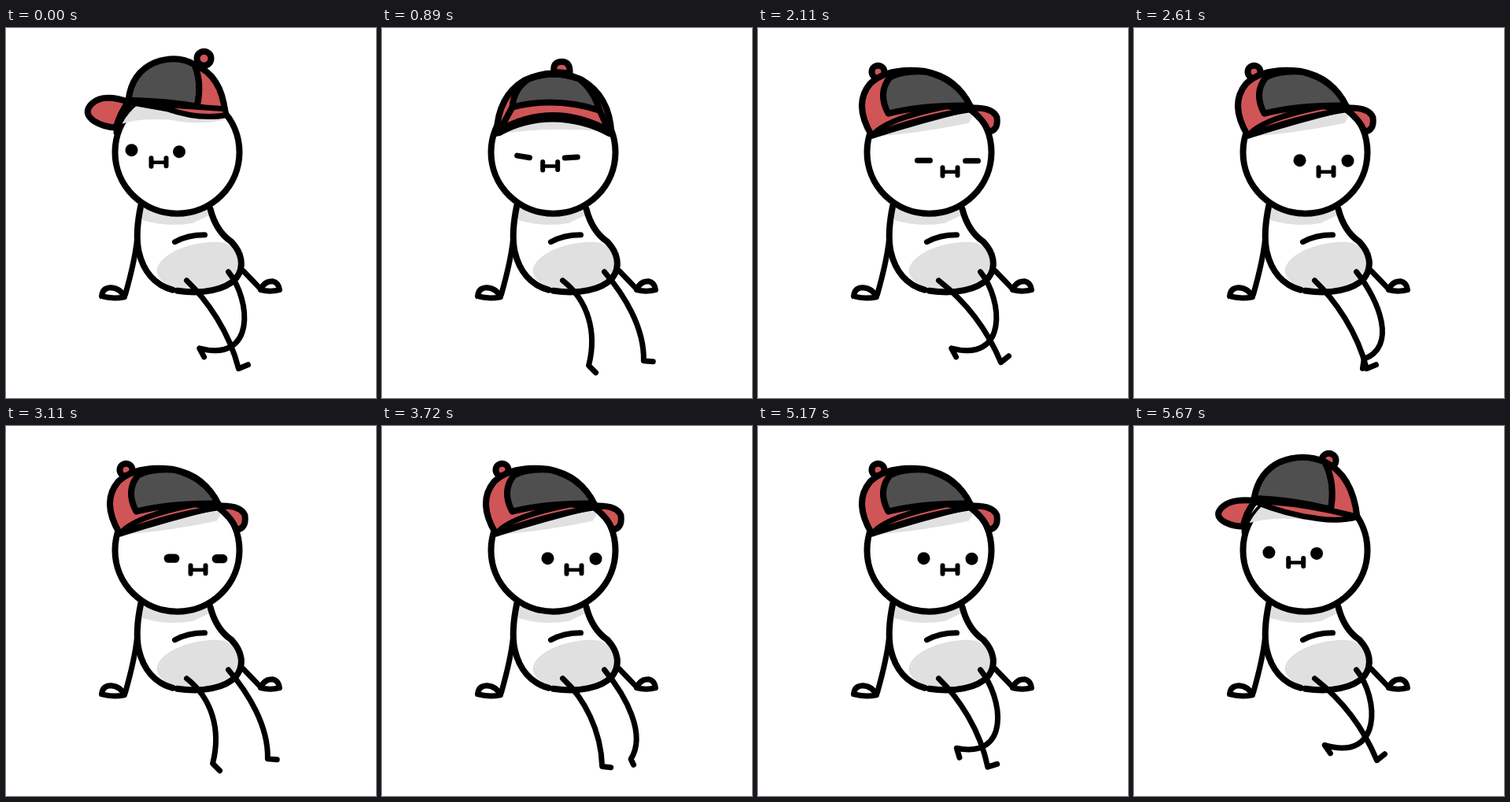
An HTML page that plays this animation: 470 by 470 pixels, repeating every 5.73 s.

```html
<!DOCTYPE html>
<html lang="en">
<head>
<meta charset="utf-8">
<title>Sitting figure</title>
<style>
  html, body { margin: 0; width: 100%; height: 100%; overflow: hidden; background: #fff; }
  svg { display: block; width: 100vw; height: 100vh; }
  .ink { fill: none; stroke: #000; stroke-width: 8; stroke-linecap: round; stroke-linejoin: round; }
  .thin { stroke-width: 7; }
  .white { fill: #fff; }
  .red { fill: #d05557; }
  .grey { fill: #4f4f4f; }
  .shade { fill: #e0e0e0; }
</style>
</head>
<body>
<svg viewBox=".5 -.7 470 470">
  <clipPath id="inHead"><ellipse cx="218" cy="157" rx="79" ry="78"/></clipPath>

  <g id="arms" class="ink thin">
    <path d="M167 268Q164 296 152 338"/>
    <path class="white" d="M122 340Q123 329 134 329Q146 330 151 341Q136 344 122 340Z"/>
    <path d="M302 308L324 331"/>
    <path class="white" d="M324 332Q328 321 339 321Q347 323 348 332Q336 335 324 332Z"/>
  </g>

  <g id="body">
    <path class="white" d="M172 222C164 268 166 322 214 332C258 342 300 326 300 302C300 265 270 278 260 226Z"/>
    <path class="shade" d="M174 226L173 243Q205 253 238 247L259 237L257 222Z"/>
    <path class="shade" d="M192 308C194 284 240 270 268 271C288 271 299 286 299 302C296 322 262 336 230 332Q195 328 192 308Z"/>
    <path class="ink" d="M172 224C166 252 166 268 169 283C175 309 190 326 212 332M218 333C250 338 280 332 293 317C304 302 300 285 287 271C271 260 264 245 260 229"/>
    <path class="ink thin" d="M215 271Q231 262 253 262"/>
  </g>

  <g class="ink thin">
    <path id="rightLeg"/>
    <path id="leftLeg"/>
  </g>

  <ellipse class="ink white" style="fill:#fff" cx="218" cy="157" rx="79" ry="78"/>

  <g id="face">
    <rect id="leftEye"/>
    <rect id="rightEye"/>
    <g id="mouth" class="ink">
      <path style="stroke-width:6" d="M-9.500 -5V5.500M9.500 -5V5"/>
      <path style="stroke-width:4.500" d="M-9 .5H9"/>
    </g>
  </g>

  <g class="cap" id="left">
    <path class="shade" clip-path="url(#inHead)" d="M160 95L148 121Q170 113 210 116Q245 123 278 116L270 105Z"/>
    <g class="ink">
      <path d="M157 96Q145 108 141 132"/>
      <circle class="red" cx="252" cy="38" r="9"/>
      <path class="grey" d="M156 91Q160 56 190 43Q219 33 240 46Q250 70 243 99Q205 92 156 91Z"/>
      <path class="red" d="M240 46Q274 59 279 107L243 99Q250 70 240 46Z"/>
      <path class="red" d="M156 93Q124 82 110 95Q97 107 113 118Q124 125 140 126Q146 106 156 93Z"/>
      <path class="red thin" d="M160 94Q207 97 279 102L280 110Q245 116 205 102Z"/>
    </g>
  </g>

  <g class="cap" id="leftLow">
    <path class="shade" clip-path="url(#inHead)" d="M153 97L145 123Q175 114 215 118Q250 123 282 118L250 106Z"/>
    <g class="ink">
      <path d="M152 98Q142 112 141 134"/>
      <circle class="red" cx="248" cy="43" r="9"/>
      <path class="grey" d="M153 91Q159 58 186 45Q215 33 243 45Q257 74 250 105Q204 93 153 91Z"/>
      <path class="red" d="M243 45Q278 62 284 115L250 107Q257 74 243 45Z"/>
      <path class="red" d="M153 94Q122 91 111 104Q102 114 117 122Q127 127 139 127Q143 108 153 97Z"/>
      <path class="red thin" d="M153 95Q200 96 250 107L284 115Q262 121 235 117Q194 112 153 95Z"/>
    </g>
  </g>

  <g class="cap" id="front">
    <path class="shade" clip-path="url(#inHead)" d="M150 134Q215 124 284 131Q215 103 150 134Z"/>
    <g class="ink">
      <path class="red" d="M219 55Q217 42 229 42Q240 42 239 57Z"/>
      <path class="red" d="M146 133Q148 86 181 66Q218 48 254 65Q290 86 292 134Q218 96 146 133Z"/>
      <path class="grey" d="M166 100Q168 76 187 64Q218 52 251 64Q269 78 277 104Q220 86 166 100Z"/>
      <path d="M166 100L154 122M277 104L286 124"/>
      <path style="stroke-width:11" d="M149 131Q218 92 290 132"/>
    </g>
  </g>

  <g class="cap" id="right">
    <path class="shade" clip-path="url(#inHead)" d="M150 137Q205 133 268 120L276 107Q205 112 150 137Z"/>
    <g class="ink">
      <circle class="red" cx="153" cy="55" r="8"/>
      <path class="red" d="M145 136Q121 96 143 70Q165 49 211 54Q255 62 270 101Q205 117 145 136Z"/>
      <path class="grey" d="M168 62Q152 82 166 108Q211 97 270 98Q254 65 214 55Q185 53 168 62Z"/>
      <path class="red" d="M268 101Q299 99 304 113Q306 130 293 131Q288 116 268 101Z"/>
      <path class="red thin" d="M146 136Q161 115 240 99L270 103Q205 113 146 136Z"/>
    </g>
  </g>
</svg>

<script>
const LOOP = 5730, FPS = 18, FRAMES = 103;
const get = id => document.getElementById(id);
const mix = (a, b, k) => a + (b - a) * k;
const clamp = x => Math.min(1, Math.max(0, x));
const ease = x => { x = clamp(x); return x * x * (3 - 2 * x); };

// Each pose: two curve handles, ankle, toe; stops give the swing at each pose
const legs = [
  {
    id: "leftLeg", hip: [230, 320], peak: 8, reach: 1, stops: [-.31, .31, .81],
    poses: [
      [262,345, 274,385, 263,428, 272,437],
      [256,345, 284,385, 296,432, 308,427],
      [262,345, 290,378, 309,424, 319,416]
    ]
  },
  {
    id: "rightLeg", hip: [283, 309], peak: 8.5, reach: .63, stops: [-.59, -.1, .59],
    poses: [
      [308,338, 334,380, 333,422, 345,423],
      [312,345, 336,400, 300,421, 299,432],
      [312,345, 318,425, 246,406, 252,417]
    ]
  }
];

// Quadratic through three poses
function blend(poses, [p, q, r], s) {
  const weights = [
    (s - q) * (s - r) / ((p - q) * (p - r)),
    (s - p) * (s - r) / ((q - p) * (q - r)),
    (s - p) * (s - q) / ((r - p) * (r - q))
  ];
  return poses[0].map((_, i) => poses.reduce((sum, pose, j) => sum + pose[i] * weights[j], 0));
}

function drawLeg({ id, hip, peak, reach, stops, poses }, beat) {
  const swing = Math.min(reach, Math.cos((beat - peak) * Math.PI / 5));
  const v = blend(poses, stops, swing);
  get(id).setAttribute("d", `M${hip}C${v.slice(0, 6)}L${v.slice(6)}`);
}

function drawEye(id, x, y, open, tilt) {
  const w = mix(23, 16, open), h = mix(7, 16, open);
  const box = { x: x - w / 2, y: y - h / 2, width: w, height: h, rx: h / 2, transform: `rotate(${tilt} ${x} ${y})` };
  for (const k in box) get(id).setAttribute(k, box[k]);
}

function drawFace(n) {
  const turn = n < FRAMES / 2 ? ease((n - 13) / 7) : 1 - ease((n - 96) / 8.75);
  const drop = 1 - (1 - turn) ** 2;
  const period = FRAMES / 5;
  const fromBlink = Math.abs((n + 3.9 + period / 2) % period - period / 2);
  const open = clamp((fromBlink - 1) / 1.9);
  const tilt = Math.sin(Math.PI * turn) * (1 - open);
  drawEye("leftEye", mix(160, 211, turn), mix(154.5, 167.5, drop), open, 10 * tilt);
  drawEye("rightEye", mix(220.5, 272, turn), mix(156.5, 168, drop), open, -4 * tilt);
  get("mouth").setAttribute("transform", `translate(${mix(194.5, 244.5, turn)} ${mix(169.5, 181.5, turn)})`);
}

function capAt(n) {
  if (n < 14) return "left";
  if (n < 15 || n > 99) return "leftLow";
  return n < 18 || n > 97 ? "front" : "right";
}

function draw(n) {
  // Ten beats make one leg swing; three beats are lost along the loop
  const beat = n - clamp(n / 16) - 2 * clamp((n - 56) / 40);
  for (const leg of legs) drawLeg(leg, beat);
  drawFace(n);
  const cap = capAt(n);
  for (const g of document.querySelectorAll(".cap")) g.style.display = g.id === cap ? "" : "none";
}

function tick() {
  const t = performance.now() % LOOP;
  draw(Math.min(FRAMES - 1, Math.floor((t + 5) * FPS / 1000)));
  requestAnimationFrame(tick);
}
tick();
</script>
</body>
</html>
```
